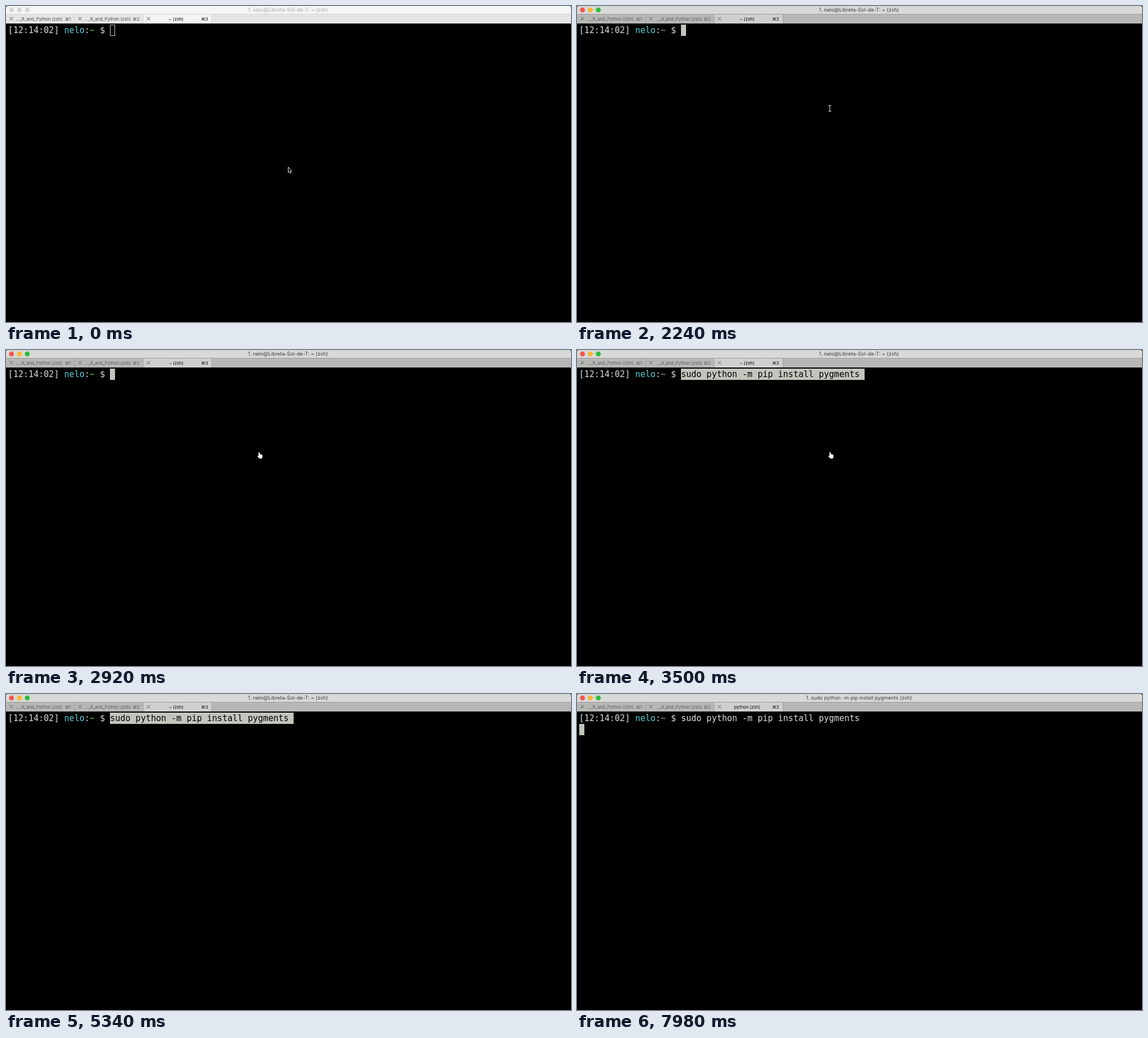
An HTML page with a canvas for the animation above (8 s loop, 1000 by 560 pixels).

```html
<!DOCTYPE html>
<html lang="en">
<head>
<meta charset="utf-8">
<title>Terminal</title>
<style>
html, body { margin: 0; width: 100%; height: 100%; overflow: hidden; background: #000; }
canvas { display: block; width: 1000px; height: 560px; }
</style>
</head>
<body>
<canvas id="stage" width="1000" height="560"></canvas>
<script>
const ctx = document.getElementById('stage').getContext('2d');
const LOOP = 8000, FOCUS = 2100, COMMAND_KEY = 2780, PASTE = 3100,
      HIDE_POINTER = 3760, DESELECT = 5660, RUN = 7680;
const UI = 'Inter, "DejaVu Sans", sans-serif';
const MONO = '15px "DejaVu Sans Mono", monospace';
const CELL = 9.03, LEFT = 3.6, INPUT = 20;
const USER = 'nelo', HOST = 'Libreta-Sol-de-T';
const COMMAND = 'sudo python -m pip install pygments';
const BLOCK = '#c3c4bd', TEXT = '#dadada';

const IDLE = { title: '#f5f5f4', bar: '#e5e5e3', tab: '#f3f3f2', line: '#d0d0ce',
  heading: '#aaa', label: '#484848', active: '#222', lights: ['#d6d6d4', '#d6d6d4', '#d6d6d4'] };
const FOCUSED = { title: '#d9d9d7', bar: '#b7b7b5', tab: '#d0d0ce', line: '#9d9d9b',
  heading: '#404040', label: '#5c5c5a', active: '#242424', lights: ['#f9564f', '#f8b92f', '#2dbd3e'] };

const TRACK = [[840, 499, 285], [1400, 451, 191.5], [1660, 448, 184.5], [1820, 447, 181]];

function rect(x, y, w, h, color) {
  ctx.fillStyle = color;
  ctx.fillRect(x, y, w, h);
}

function text(str, x, y, font, color, align = 'left') {
  ctx.font = font;
  ctx.fillStyle = color;
  ctx.textAlign = align;
  ctx.fillText(str, x, y);
}

function cells(str, col, color) {
  text(str, LEFT + col * CELL, 48, MONO, color);
}

function polygon(points, fill, stroke) {
  ctx.beginPath();
  points.forEach(([x, y]) => ctx.lineTo(x, y));
  ctx.closePath();
  ctx.fillStyle = fill;
  ctx.fill();
  ctx.strokeStyle = stroke;
  ctx.lineWidth = 1;
  ctx.stroke();
}

function cross(x, y, color) {
  ctx.strokeStyle = color;
  ctx.lineWidth = 1;
  ctx.beginPath();
  ctx.moveTo(x - 3, y - 3); ctx.lineTo(x + 3, y + 3);
  ctx.moveTo(x + 3, y - 3); ctx.lineTo(x - 3, y + 3);
  ctx.stroke();
}

function drawTab(i, label, theme, active) {
  const x = i * 121.3, color = active ? theme.active : theme.label;
  const weight = active ? '500 ' : '';
  if (active) rect(x + 1, 15, 121, 16, theme.tab);
  cross(x + 9.5, 22.5, theme.label);
  text(label, x + 58.5, 26, `${weight}7.7px ${UI}`, color, 'center');
  text('⌘' + (i + 1), x + 115, 26, `${weight}7.7px ${UI}`, color, 'right');
  rect(Math.round(x + 121.3), 15, 1, 16, theme.line);
}

function drawWindow(t) {
  const theme = t < FOCUS ? IDLE : FOCUSED, running = t >= RUN;
  rect(0, 0, 1000, 560, '#000');
  ctx.fillStyle = theme.title;
  ctx.beginPath();
  ctx.roundRect(0, 0, 1000, 31, [3, 3, 0, 0]);
  ctx.fill();
  rect(0, 15, 1000, 16, theme.bar);
  rect(0, 14, 1000, 1, theme.line);
  theme.lights.forEach((color, i) => {
    ctx.fillStyle = color;
    ctx.beginPath();
    ctx.arc(9.7 + i * 14, 7, 4.4, 0, Math.PI * 2);
    ctx.fill();
  });
  const title = running ? `1. ${COMMAND} (zsh)` : `1. ${USER}@${HOST}: ~ (zsh)`;
  text(title, 499, 10.3, `9px ${UI}`, theme.heading, 'center');
  drawTab(0, '…_R_and_Python (zsh)', theme);
  drawTab(1, '…_R_and_Python (zsh)', theme);
  drawTab(2, running ? 'python (zsh)' : '~ (zsh)', theme, true);
}

function drawShell(t) {
  const x = LEFT + INPUT * CELL, end = x + COMMAND.length * CELL;
  const pasted = t >= PASTE, selected = pasted && t < DESELECT;
  cells('[12:14:02]', 0, TEXT);
  cells(USER, 11, '#58d0d5');
  cells(':', 15, TEXT);
  cells('~', 16, '#72c95c');
  cells('$', 18, TEXT);
  if (t < FOCUS) {
    ctx.strokeStyle = '#c9c9b0';
    ctx.lineWidth = 1;
    ctx.strokeRect(184.5, 33.5, 8, 19);
  } else if (!pasted) {
    rect(184, 33, 9, 20, BLOCK);
  } else if (selected) {
    rect(184, 33, 325, 20, BLOCK);
  } else if (t < RUN) {
    rect(Math.round(end), 33, 9, 20, BLOCK);
  } else {
    rect(4, 53, 9, 20, BLOCK);
  }
  if (pasted) cells(COMMAND, INPUT, selected ? '#000' : TEXT);
}

function pointerAt(t) {
  if (t <= TRACK[0][0]) return TRACK[0].slice(1);
  for (let i = 1; i < TRACK.length; i++) {
    const [t0, x0, y0] = TRACK[i - 1], [t1, x1, y1] = TRACK[i];
    if (t > t1) continue;
    let k = (t - t0) / (t1 - t0);
    if (i === 1) k = k * k * (3 - 2 * k);
    return [x0 + (x1 - x0) * k, y0 + (y1 - y0) * k];
  }
  return TRACK[TRACK.length - 1].slice(1);
}

function drawArrow() {
  polygon([[.5, .5], [.5, 10], [2.5, 8.2], [4, 11.5], [5.5, 10.8], [4.1, 7.6], [6.8, 7.4]],
    '#000', '#e8e8e8');
}

function drawBeam() {
  ctx.strokeStyle = '#ddd';
  ctx.lineWidth = 1;
  ctx.beginPath();
  ctx.moveTo(-2, -4.5); ctx.lineTo(3, -4.5);
  ctx.moveTo(.5, -4.5); ctx.lineTo(.5, 5.5);
  ctx.moveTo(-2, 5.5); ctx.lineTo(3, 5.5);
  ctx.stroke();
}

function drawHand() {
  polygon([[0, 1], [1.6, 1], [2.2, 4], [5.5, 4.6], [6.8, 5.8], [6.2, 9], [5.6, 11],
    [1.6, 11], [-1.6, 7.6], [-1, 6.4], [.8, 7.2]], '#fff', '#eee');
}

function drawPointer(t) {
  if (t >= HIDE_POINTER) return;
  ctx.save();
  ctx.translate(...pointerAt(t));
  if (t < FOCUS) drawArrow();
  else if (t < COMMAND_KEY) drawBeam();
  else drawHand();
  ctx.restore();
}

function tick(now) {
  const t = now % LOOP;
  drawWindow(t);
  drawShell(t);
  drawPointer(t);
  requestAnimationFrame(tick);
}
requestAnimationFrame(tick);
</script>
</body>
</html>
```
